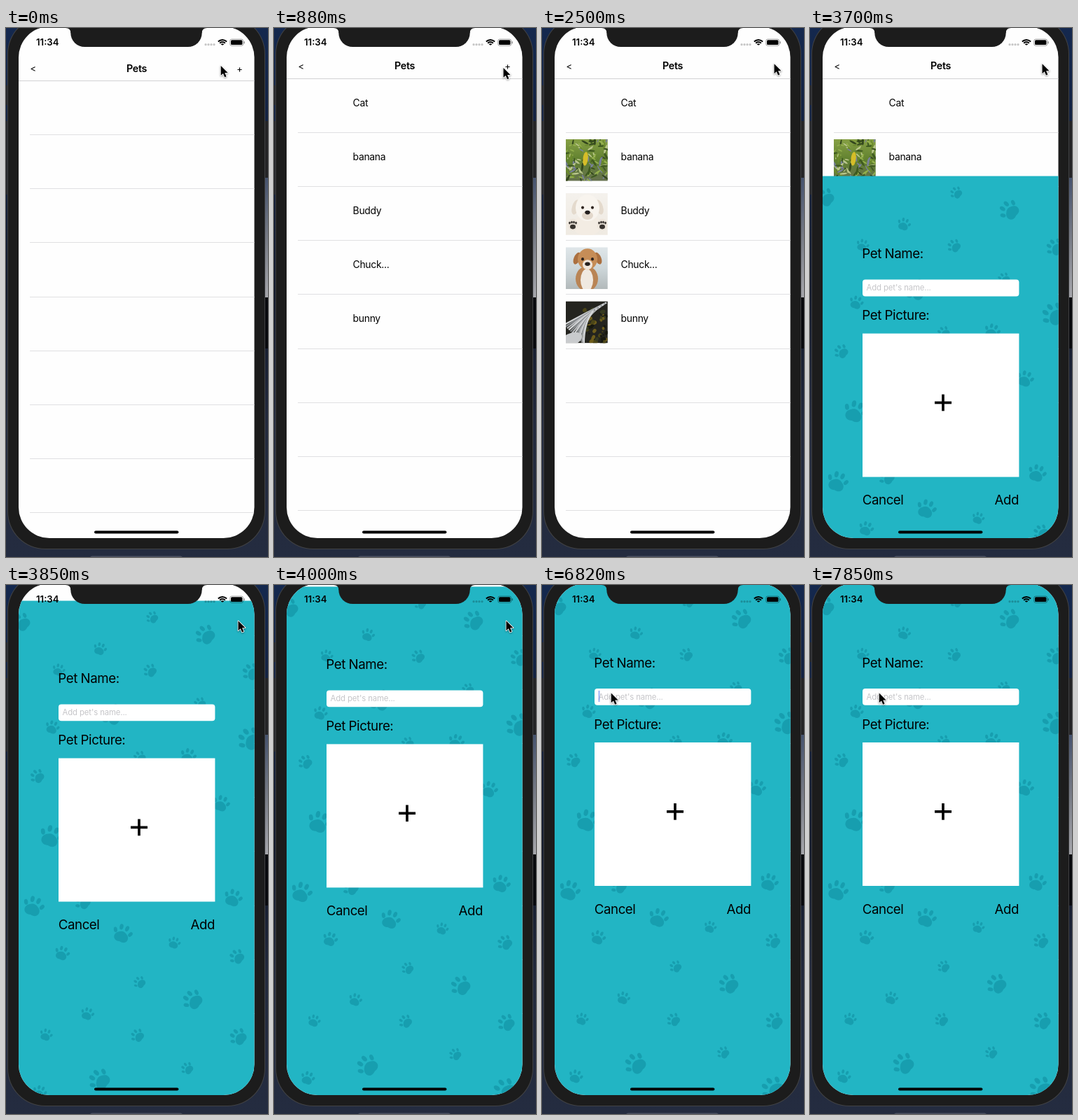
An HTML page with a canvas that plays this animation: 374x756 px, repeating every 8000 ms.

```html
<!DOCTYPE html>
<html lang="en">
<head>
<meta charset="utf-8">
<title>Pets</title>
<style>
  html, body { margin: 0; width: 100%; height: 100%; overflow: hidden; background: #1c2438; }
  canvas { display: block; width: 374px; height: 756px; }
</style>
</head>
<body>
<canvas id="stage"></canvas>
<script>
const W = 374, H = 756, LOOP = 8000, TICK = 148.1;
const canvas = document.getElementById('stage');
const ctx = canvas.getContext('2d');
const ratio = window.devicePixelRatio || 1;
canvas.width = W * ratio;
canvas.height = H * ratio;

const BEZEL = '#1c1c1c', TEAL = '#22b5c4', PAW = '#179eaf';
const ROW = 77.19;

// ---------- helpers ----------
function rect(x, y, w, h, color) {
  ctx.fillStyle = color;
  ctx.fillRect(x, y, w, h);
}
function round(x, y, w, h, r, color) {
  ctx.beginPath();
  ctx.roundRect(x, y, w, h, r);
  ctx.fillStyle = color;
  ctx.fill();
}
function oval(x, y, rx, ry, color, turn = 0) {
  ctx.beginPath();
  ctx.ellipse(x, y, rx, ry, turn, 0, Math.PI * 2);
  ctx.fillStyle = color;
  ctx.fill();
}
function text(str, x, y, size, { weight = 400, color = '#000', align = 'left', gap = 0 } = {}) {
  ctx.font = `${weight} ${size}px Inter, Roboto, sans-serif`;
  ctx.letterSpacing = gap + 'px';
  ctx.textAlign = align;
  ctx.fillStyle = color;
  ctx.fillText(str, x, y);
}
function shade(y0, y1, ...colors) {
  const g = ctx.createLinearGradient(0, y0, 0, y1);
  colors.forEach((c, i) => g.addColorStop(i / (colors.length - 1), c));
  return g;
}
function random(seed) {
  return () => (seed = (seed * 16807) % 2147483647) / 2147483647;
}
function scatter(seed, count, draw) {
  const rnd = random(seed);
  for (let i = 0; i < count; i++) draw(rnd() * 60, rnd() * 60, rnd(), i);
}

// ---------- pictures, 60 x 60 each ----------
function leaves() {
  rect(0, 0, 60, 60, shade(0, 60, '#86a045', '#60802f', '#667150'));
  const tones = ['#3f5a20', '#93b04c', '#b9c68a', '#6b8a2c', '#34481d', '#78809a'];
  scatter(71, 110, (x, y, r, i) => oval(x, y, .6 + r, 2 + r * 5, tones[i % 6], r * 7));
  oval(28, 28, 3.6, 10, '#d6bd28', .12);
}
function face(eyes) {
  for (const side of [-7, 7]) oval(31 + side, eyes, 2, 2.2, '#2c221d');
  oval(31, eyes + 7, 3.7, 2.8, '#241f1e');
}
function whitePup() {
  rect(0, 0, 60, 60, shade(0, 60, '#f4f1ec', '#efeae2'));
  for (const side of [-1, 1]) oval(31 + side * 17, 20, 5, 11, '#e4dacd', -side * .3);
  oval(30, 46, 20, 15, '#f3ece3');
  oval(31, 21, 17, 19, '#f8f4ee');
  oval(31, 32, 8, 6, '#e2d7ca');
  face(20.5);
  for (const x of [10, 52]) {
    oval(x, 45, 7.5, 8.5, '#eee6dc');
    oval(x, 48, 4, 3.3, '#38332f');
    for (let i = -1.5; i < 2; i++) oval(x + i * 3, 41 + Math.abs(i), 1.3, 1.9, '#38332f');
  }
}
function brownPup() {
  rect(0, 0, 60, 60, shade(0, 60, '#dfe6e9', '#cdd6d9', '#b2b9ba'));
  oval(30, 45, 16, 18, '#b98455');
  oval(30, 47, 9, 16, '#f0e9e1');
  for (const side of [-1, 1]) oval(31 + side * 15, 16, 4.5, 9, '#ab7040', -side * .4);
  oval(31, 17, 14, 15, '#c68d57');
  oval(31, 25, 7, 7, '#efe5da');
  face(17);
}
function river() {
  rect(0, 0, 60, 60, '#24241f');
  const rock = ['#4c4618', '#17180f', '#6e5d1b', '#363a20'];
  scatter(19, 60, (x, y, r, i) => oval(24 + x * .6, 12 + y * .8, 1 + r * 3, 1 + r * 2, rock[i % 4], r * 3));
  for (let i = 0; i < 13; i++) {
    ctx.beginPath();
    ctx.moveTo(58 - i * 1.6, 2 + i);
    ctx.quadraticCurveTo(26, 18 + i, i * 2.4 - 3, 34 + i * 2.3);
    ctx.lineWidth = 2.2;
    ctx.strokeStyle = ['#d5d7d9', '#8a8e91', '#b8babd'][i % 3];
    ctx.stroke();
  }
  oval(7, 55, 17, 9, '#c9cbcd', -.4);
}

const pets = [
  { name: 'Cat' },
  { name: 'banana', photo: leaves, from: 10 },
  { name: 'Buddy', photo: whitePup, from: 16 },
  { name: 'Chuck...', photo: brownPup, from: 11 },
  { name: 'bunny', photo: river, from: 17 }
];

// ---------- surroundings ----------
function desktop() {
  rect(0, 0, W, H, shade(0, H, '#14284e', '#13203c', '#101729', '#232a3d', '#242c40'));
  rect(0, 82, 4, 28, '#25262a');
  rect(0, 133, 4, 105, '#25262a');
  rect(368, 133, 6, 81, '#242426');
  rect(368, 214, 6, 171, shade(214, 385, '#46536e', '#777b85', '#a5a6ab'));
  rect(368, 385, 6, 73, '#08090d');
  round(120, 754.5, 132, 6, 3, '#4a5060');
  round(2, -17, 368, 762, 54, '#414244');
  round(3, -16, 366, 760, 53, BEZEL);
}
function notch() {
  round(92.3, -30, 187.4, 57, 20, BEZEL);
  ctx.beginPath();
  ctx.moveTo(85, 0);
  ctx.quadraticCurveTo(92, 0, 92.5, 7);
  ctx.lineTo(279.5, 7);
  ctx.quadraticCurveTo(280, 0, 287, 0);
  ctx.fill();
}
function statusBar() {
  text('11:34', 43, 25.2, 13.2, { weight: 600 });
  for (let i = 0; i < 4; i++) oval(285 + i * 4, 23.7, 1.6, 1.6, 'rgba(0,0,0,.22)');
  ctx.strokeStyle = '#000';
  ctx.lineWidth = 2;
  for (const r of [8.4, 5.2, 2]) {
    ctx.beginPath();
    ctx.arc(309, 25.3, r, -Math.PI * .76, -Math.PI * .24);
    ctx.stroke();
  }
  ctx.beginPath();
  ctx.roundRect(319.7, 16, 19, 9.4, 2.6);
  ctx.lineWidth = .9;
  ctx.strokeStyle = 'rgba(0,0,0,.4)';
  ctx.stroke();
  round(321, 17.3, 16.4, 6.8, 1.5, '#000');
  round(339.5, 19, 1.3, 3.4, .7, 'rgba(0,0,0,.45)');
}

// ---------- pet list ----------
function list(n) {
  const dy = n < 1 ? 3.3 : 0;
  const pressed = n >= 12;
  rect(18, 0, 337, 730, '#fefefe');
  rect(18, Math.floor(72.3 + dy), 337, 1, '#d2d2d4');
  text('Pets', 186.5, 59.4 + dy, 14.3, { weight: 600, align: 'center', gap: -.4 });
  text('<', 38.8, 59.6 + dy, 13, { align: 'center' });
  text('+', 333.5, 59.2 + dy, 13, { align: 'center', color: pressed ? '#ccc' : '#000' });
  for (let k = 0; k < 8; k++) rect(34, Math.floor(149.3 + dy + ROW * k), 321, 1, '#e0e0e2');
  if (n < 5) return;
  pets.forEach((p, i) => {
    text(p.name, 112.6, 111.7 + ROW * i, 13.9, { gap: -.3 });
    if (!p.photo || n < p.from) return;
    ctx.save();
    ctx.translate(34, 81.7 + ROW * i);
    ctx.beginPath();
    ctx.rect(0, 0, 59.7, 59.7);
    ctx.clip();
    p.photo();
    ctx.restore();
  });
}

// ---------- form ----------
// paw centres of one wallpaper tile, from the smallest paw to the largest
const spots = [
  [209, 24], [240, 489], [277, 147], [75, 99], [191, 224], [134, 69], [206, 100], [66, 181],
  [45, 251], [80, 504], [330, 509], [260, 222], [110, 430], [307, 290], [350, 102], [324, 425],
  [22, 31], [166, 476], [285, 49], [39, 437], [152, 163], [64, 337], [348, 198]
];
function paw(x, y, size, turn) {
  ctx.save();
  ctx.translate(x, y);
  ctx.rotate(turn);
  ctx.scale(size, size);
  ctx.beginPath();
  ctx.moveTo(0, .8);
  for (const side of [1, -1]) {
    const a = [side * .75, 1, side * .95, .2, side * .4, -.1];
    if (side > 0) ctx.bezierCurveTo(...a);
    else {
      ctx.quadraticCurveTo(0, -.4, -.4, -.1);
      ctx.bezierCurveTo(-.95, .2, -.75, 1, 0, .8);
    }
  }
  ctx.fillStyle = PAW;
  ctx.fill();
  for (const side of [-1, 1]) {
    oval(side * .3, -.65, .19, .29, PAW, side * .1);
    oval(side * .79, -.2, .18, .27, PAW, side * .45);
  }
  ctx.restore();
}
function wallpaper() {
  rect(18, 0, 337, 731, TEAL);
  for (const k of [0, 1]) {
    spots.forEach(([x, y], i) => {
      const size = 9 + 8 * Math.pow(i / 22, 1.7);
      paw(x - 18 * k, y + 521.5 * k, size, i % 2 ? .33 : -.9);
    });
  }
}
function caret(n) {
  const phase = (n - 42) % 7;
  if (n < 42 || n >= 53 || phase === 5 || phase === 6) return;
  rect(80.5, 151, 2, 16, phase === 4 ? 'rgba(66,107,242,.5)' : '#426bf2');
}
function form(n) {
  if (n < 25) return;
  const dy = 211.6 * Math.pow(.1065, n - 25);
  ctx.save();
  ctx.translate(0, dy < .1 ? 0 : dy);
  wallpaper();
  const label = { gap: -.45 };
  text('Pet Name:', 74.3, 117.8, 18.7, label);
  text('Pet Picture:', 74.3, 205.7, 18.7, label);
  text('Cancel', 74.8, 469.8, 18.7, label);
  text('Add', 298, 469.8, 18.7, { gap: -.45, align: 'right' });
  round(75, 148, 223.4, 23.8, 4, '#fff');
  text("Add pet's name...", 80.6, 163.8, 11.3, { color: '#c5c5c8', gap: -.1 });
  caret(n);
  rect(75, 225, 223.4, 205, '#fff');
  rect(178, 322, 24, 3.7, '#000');
  rect(188.1, 312, 3.7, 23.7, '#000');
  ctx.restore();
}

// ---------- pointer ----------
const moves = [
  { from: 0, to: 6, x: 327.5, y: 57 },
  { from: 6, to: 12, x: 331.5, y: 51.3 },
  { from: 27, to: 31, x: 138, y: 157 },
  { from: 35, to: 37, x: 105.7, y: 154.5 },
  { from: 41, to: 43, x: 98.7, y: 154.5 }
];
function pointer(n) {
  let x = 306.7, y = 54;
  for (const m of moves) {
    const t = Math.min(1, Math.max(0, (n - m.from) / (m.to - m.from)));
    const k = t * t * (3 - 2 * t);
    x += (m.x - x) * k;
    y += (m.y - y) * k;
  }
  ctx.save();
  ctx.translate(x, y);
  ctx.scale(.95, .95);
  ctx.lineJoin = 'round';
  ctx.lineWidth = 1.8;
  ctx.strokeStyle = '#fff';
  ctx.shadowColor = 'rgba(0,0,0,.4)';
  ctx.shadowBlur = 2.5 * ratio;
  ctx.shadowOffsetY = ratio;
  const arrow = new Path2D('M0 0V14.6L3.4 11.5L5.8 17L8.3 16L5.9 10.6L10.5 10.4Z');
  ctx.stroke(arrow);
  ctx.shadowColor = 'transparent';
  ctx.fillStyle = '#000';
  ctx.fill(arrow);
  ctx.restore();
}

function draw(now) {
  const n = Math.floor((now % LOOP) / TICK + .14);
  ctx.setTransform(ratio, 0, 0, ratio, 0, 0);
  desktop();
  ctx.save();
  ctx.beginPath();
  ctx.roundRect(18, -2, 336.5, 731, 44);
  ctx.clip();
  list(n);
  form(n);
  statusBar();
  round(126, 718.5, 120.4, 4, 2, '#000');
  ctx.restore();
  notch();
  pointer(n);
}

let start;
function loop(now) {
  if (start === undefined) start = now;
  draw(now - start);
  requestAnimationFrame(loop);
}
draw(0);
requestAnimationFrame(loop);
</script>
</body>
</html>
```
